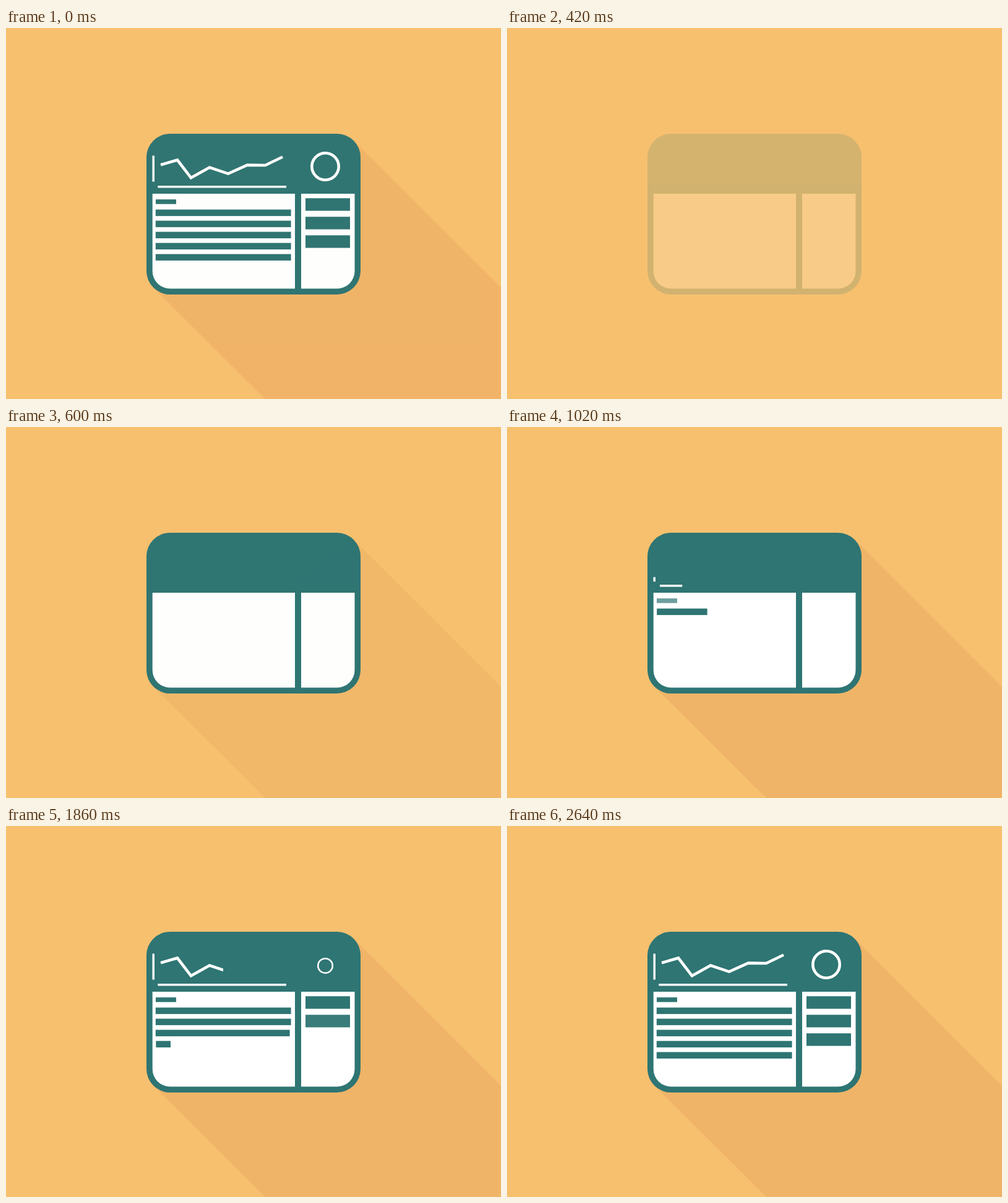
Animation of 800 by 600 pixels, one loop 2720 ms. Source, as an HTML page:

```html
<!DOCTYPE html>
<html lang="en">
<head>
<meta charset="utf-8">
<title>Dashboard icon</title>
<style>
  html, body { margin: 0; width: 100%; height: 100%; overflow: hidden; background: #f7c06f; }
  svg { display: block; }
</style>
</head>
<body>
<svg id="stage" width="800" height="600" viewBox="0 0 800 600">
  <defs><clipPath id="reveal"><rect id="wipe" x="248" y="195" width="201" height="58"/></clipPath></defs>
  <g id="icon">
    <path id="shadow" fill="#f0b468" d="M562 182L801 421V600H419L238 420Z"/>
    <g id="card">
      <rect x="227" y="171" width="346" height="260" rx="38" fill="#2e7573"/>
      <path fill="#fff" d="M236.7 268H467V421.5H265.2A28.5 28.5 0 0 1 236.7 393Z
        M477 268H563.5V393A28.5 28.5 0 0 1 535 421.5H477Z"/>
    </g>
    <g id="parts">
      <polyline clip-path="url(#reveal)" fill="none" stroke="#fff" stroke-width="4.6"
        points="250,221.3 277,213.5 299,242.3 329,225.6 359,235.6 390,221.6 419,222 447,208.5"/>
    </g>
  </g>
</svg>
<script>
const LOOP = 2720, FADE_OUT = 100;
const TEAL = '#2e7573', WHITE = '#fff';
const byId = id => document.getElementById(id);
const tracks = [];

const animate = (start, duration, apply) => tracks.push({ start, duration, apply });
const ease = u => u * u * (3 - 2 * u);

function add(tag, attrs) {
  const node = document.createElementNS('http://www.w3.org/2000/svg', tag);
  for (const key in attrs) node.setAttribute(key, attrs[key]);
  return byId('parts').appendChild(node);
}
const bar = (x, y, width, height, fill) => add('rect', { x, y, width, height, fill });

const fadeIn = (node, start, duration) =>
  animate(start, duration, p => node.setAttribute('opacity', p));

// Grows a shape from the point (x, y) along the chosen axes.
const grow = (node, start, duration, x, y, alongX, alongY) =>
  animate(start, duration, p => node.setAttribute('transform',
    `translate(${x} ${y}) scale(${alongX ? p : 1} ${alongY ? p : 1}) translate(${-x} ${-y})`));

fadeIn(byId('card'), 350, 265);
fadeIn(byId('shadow'), 345, 450);

fadeIn(bar(242, 277.2, 33, 7.5, TEAL), 840, 285);
[867, 1235, 1510, 1785, 2035].forEach((start, i) =>
  grow(bar(241.8, 293.6 + 18 * i, 218.8, 10.5, TEAL), start, 372, 242.4, 0, true, false));
[1270, 1600, 1930].forEach((start, i) =>
  fadeIn(bar(484, 275.3 + 30 * i, 72, 20.3, TEAL), start, 305));

grow(bar(236.5, 206.5, 3.5, 42, WHITE), 920, 380, 0, 250.4, false, true);
grow(bar(245.3, 255, 207.7, 3.5, WHITE), 920, 380, 247.4, 0, true, false);

const ring = add('circle', { cx: 516, cy: 224, r: 21.7, fill: 'none', stroke: WHITE, 'stroke-width': 4.6 });
grow(ring, 1660, 380, 516, 228.4, true, true);
animate(1510, 690, p => byId('wipe').setAttribute('width', 201 * p));

function draw(now) {
  const t = now % LOOP, leaving = t < FADE_OUT;
  byId('icon').setAttribute('opacity', leaving ? 1 - t / FADE_OUT : 1);
  for (const { start, duration, apply } of tracks) {
    const u = Math.min(1, Math.max(0, (t - start) / duration));
    apply(leaving ? 1 : ease(u));
  }
}

const origin = performance.now();
function tick() {
  draw(performance.now() - origin);
  requestAnimationFrame(tick);
}
draw(0);
requestAnimationFrame(tick);
</script>
</body>
</html>
```
